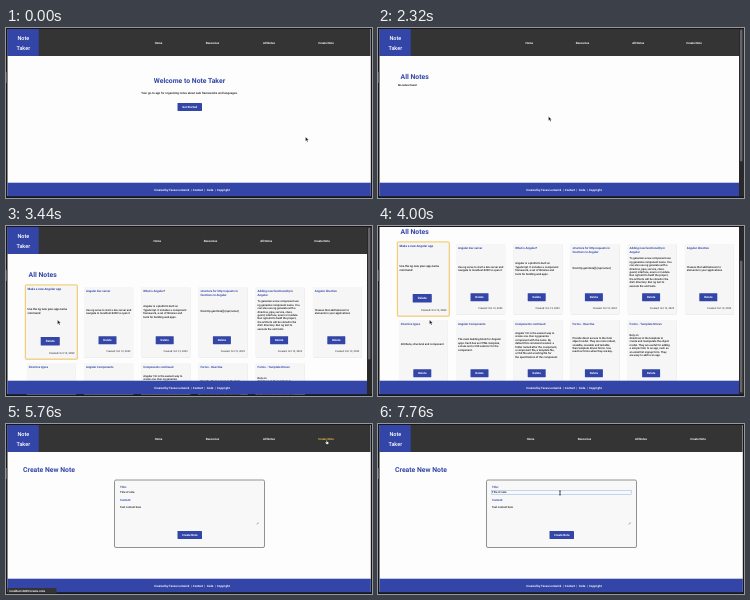
An HTML page that plays this animation: 366x170 px, repeating every 8 s.

```html
<!DOCTYPE html>
<html lang="en">
<head>
<meta charset="utf-8">
<title>Note Taker</title>
<style>
html, body { margin: 0; width: 100%; height: 100%; overflow: hidden; background: #fff; }
svg { display: block; width: 366px; height: 170px; }
text { font-family: Roboto, sans-serif; font-size: 2.9px; font-weight: 500; fill: #111; text-rendering: geometricPrecision; white-space: pre; }
.blue { fill: #3346a8; }
text.h1 { font-size: 6.85px; font-weight: 600; fill: #3346a8; }
text.bold { font-weight: 700; }
text.white { fill: #fff; font-weight: 700; }
text.small { font-size: 2.7px; }
text.date { font-size: 2.5px; fill: #444; }
text.logo { font-size: 5.5px; fill: #fff; }
</style>
</head>
<body>
<svg id="stage" viewBox="0 0 366 170"></svg>
<script>
const LOOP = 8000;
const OPEN_NOTES = 2240, NOTES_LOADED = 2640, OPEN_FORM = 5760;
const GOLD = '#f3bf3f';

const rect = (x, y, w, h, attrs = '') => `<rect x="${x}" y="${y}" width="${w}" height="${h}" ${attrs}/>`;
const text = (x, y, str, cls = '', anchor = 'start') =>
  `<text x="${x}" y="${y}" class="${cls}" text-anchor="${anchor}">${str.replace(/</g, '&lt;')}</text>`;
const group = (id, body) => `<g id="${id}">${body}</g>`;
const button = (x, y, w, label) =>
  rect(x, y, w, 8, 'class="blue" rx=".4"') + text(x + w / 2, y + 5, label, 'white', 'middle');

// title / body, lines split by "|"
const notes = [
  ['Make a new Angular app', 'Use the ng new your-app-name|command'],
  ['Angular dev server', 'Use ng serve to start a dev server and|navigate to localhost:4200 to open it'],
  ['What is Angular?', 'Angular is a platform built on|TypeScript. It includes a component|framework, a set of libraries and|tools for building web apps.'],
  ['structure for http requests in|functions in Angular', "this.http.get<Note[]>('api/notes')"],
  ['Adding new functionality in|Angular', 'To generate a new component use|ng generate component name. You|can also use ng generate with a|directive, pipe, service, class,|guard, interface, enum or module.|Run ng build to build the project,|the artifacts will be stored in the|dist/ directory. Run ng test to|execute the unit tests.'],
  ['Angular directive', 'Classes that add behavior to|elements in your applications'],
  ['Directive types', 'Attribute, structural and component'],
  ['Angular Components', 'The main building block for Angular|apps. Each has an HTML template,|a class and a CSS selector for the|component.'],
  ['Components continued', 'Angular CLI is the easiest way to|create one. Run ng generate|component with the name. By|default this command creates: a|folder named after the component,|a component file, a template file,|a CSS file and a testing file for|the specification of the component.'],
  ['Forms - Reactive', 'Provide direct access to the form|object model. They are more robust,|scalable, reusable and testable|than template driven forms. Use|reactive forms when they are key.'],
  ['Forms - Template Driven', 'Rely on|directives in the template to|create and manipulate the object|model. They are useful for adding|a simple form to an app, such as|an email list signup form. They|are easy to add to an app.']
];

const cardX = i => 20.8 + (i % 6) * 57.2;
const cardY = i => 61 + Math.floor(i / 6) * 76;

function card([title, body], i) {
  const x = cardX(i), y = cardY(i), heading = title.split('|'), lines = body.split('|');
  const first = y + Math.max(25.2 - (lines.length - 1) * 1.6, 7.5 + heading.length * 3.9);
  return group('card' + i,
    rect(x + .2, y + .4, 49, 70, 'fill="#e0e0e0" rx=".6"') +
    rect(x, y, 49, 70, 'fill="#f6f6f6" rx=".6" class="face"') +
    heading.map((line, k) => text(x + 2, y + 5 + k * 3.9, line, 'bold blue')).join('') +
    lines.map((line, k) => text(x + 2, first + k * 3.4, line, 'small')).join('') +
    button(x + 14.5, y + 49.2, 18, 'Delete') +
    text(x + 46.5, y + 65.2, 'Created: Oct 12, 2022', 'date', 'end'));
}

const nav = ['Home', 'Resources', 'All Notes', 'Create Note'];
const navWide = [152.5, 206.5, 263, 320], navNarrow = [151.3, 204.5, 260.3, 316];

const header = rect(1.5, 1, 363, 27, 'fill="#343434"') + rect(1.5, 1, 31.2, 27, 'class="blue"') +
  text(17.3, 12, 'Note', 'logo', 'middle') + text(17.3, 22, 'Taker', 'logo', 'middle') +
  nav.map((label, k) => `<g id="nav${k}">${text(0, 15.8, label, 'white', 'middle')}</g>`).join('');

const home = text(183.5, 55.3, 'Welcome to Note Taker', 'h1', 'middle') +
  text(183.5, 66, 'Your go-to app for organizing notes about web frameworks and languages.', '', 'middle') +
  button(171.5, 75, 24.5, 'Get Started');

const form = text(17, 48.2, 'Create New Note', 'h1') +
  rect(108.5, 56, 150, 67.5, 'fill="#f8f8f8" stroke="#777" stroke-width=".8" rx="1.5"') +
  text(114, 64, 'Title:', 'blue bold') + text(114, 69.3, 'Title of note', 'small') +
  rect(113.7, 66.4, 139.5, 4, 'id="focus" fill="none" stroke="#8fb4e6" stroke-width=".5"') +
  text(114, 77.3, 'Content:', 'blue bold') + text(114, 83.6, 'Text content here', 'small') +
  '<path d="M250.5 100.3l2-2M251.5 100.3l1-1" stroke="#555" stroke-width=".4"/>' +
  button(171.5, 107, 24.5, 'Create Note');

document.getElementById('stage').innerHTML =
  rect(0, 0, 366, 170, 'fill="#17171a"') + rect(1.5, 1, 363.3, 167, 'fill="#fdfdfd"') +
  rect(0, 44, 1.2, 11, 'fill="#555"') +
  group('page',
    group('header', header) + group('home', home) + group('form', form) +
    group('notes', text(22.6, 51, 'All Notes', 'h1') +
      group('empty', text(20, 58, 'No notes found', 'bold small')) +
      group('cards', notes.map(card).join('')))) +
  rect(1.5, 154.7, 363.3, 13.8, 'class="blue"') +
  text(186, 162.8, 'Created by Tessa Lornwick  |  Contact  |  Code  |  Copyright', 'white', 'middle') +
  group('scrollbar', rect(361, 0, 5, 168.5, 'fill="#29292b"') + rect(362, 1.5, 2.4, 132, 'id="thumb" fill="#66666a" rx="1.2"')) +
  rect(0, 0, 366, 1, 'fill="#17171a"') + rect(0, 168.5, 366, 1.5, 'fill="#17171a"') +
  group('status', rect(1.5, 164, 49, 5.5, 'fill="#343437" rx=".6"') +
    text(3.5, 167.8, 'localhost:4200/create-note', 'white')) +
  group('cursor',
    '<path id="arrow" d="M0 0v4.2l1-.9.8 1.6.8-.4-.8-1.5h1.4z" fill="#111" stroke="#fff" stroke-width=".3"/>' +
    '<path id="hand" d="M-.4-1.8h.9v1.6l1.7.5-.3 2.4h-2.4l-1.2-2 .5-.4.8.7z" fill="#fff" stroke="#111" stroke-width=".45"/>' +
    '<path id="beam" d="M-.7-2h1.4M0-2v4M-.7 2h1.4" stroke="#111" stroke-width=".7"/>');

const $ = id => document.getElementById(id);
const show = (id, on) => $(id).style.display = on ? '' : 'none';
const clamp = v => Math.max(0, Math.min(1, v));
const ramp = (t, from, to) => { const p = clamp((t - from) / (to - from)); return p * p * (3 - 2 * p); };
const pulse = (t, from, to) => ramp(t, from, from + 140) - ramp(t, to - 70, to + 70);

// time, x, y
const path = [
  [0, 299.5, 109], [880, 262, 103], [1360, 250, 101], [2080, 180, 80], [2200, 180, 80],
  [2320, 170.5, 88.5], [2560, 150, 92], [3120, 51.5, 94], [4700, 51.5, 94], [5200, 320, 17],
  [6160, 321, 18], [6480, 318, 22], [7200, 205, 66], [7520, 182, 69], [LOOP, 182, 69]
];
function cursorAt(t) {
  const k = path.findIndex(p => p[0] > t), [t0, x0, y0] = path[k - 1], [t1, x1, y1] = path[k];
  const p = ramp(t, t0, t1);
  return [x0 + (x1 - x0) * p, y0 + (y1 - y0) * p];
}

function hoverCard(i, amount) {
  const x = cardX(i) + 24.5, y = cardY(i) + 35, scale = 1 + .06 * amount;
  const el = $('card' + i), face = el.querySelector('.face');
  el.setAttribute('transform', `translate(${x} ${y}) scale(${scale}) translate(${-x} ${-y})`);
  face.setAttribute('stroke', GOLD);
  face.setAttribute('stroke-width', .8 * amount);
}

function draw(t) {
  const onNotes = t >= OPEN_NOTES && t < OPEN_FORM, onForm = t >= OPEN_FORM;
  show('home', t < OPEN_NOTES);
  show('notes', onNotes);
  show('form', onForm);
  show('scrollbar', onNotes);
  show('empty', t < NOTES_LOADED);
  show('cards', t >= NOTES_LOADED);

  const scroll = onNotes ? 43 * (ramp(t, 3560, 3940) - ramp(t, 4240, 4600)) : 0;
  $('page').setAttribute('transform', `translate(0 ${-scroll})`);
  $('thumb').setAttribute('y', 1.5 + scroll * .77);

  hoverCard(0, pulse(t, 3040, 4070) + pulse(t, 4680, 4860));
  hoverCard(6, pulse(t, 4030, 4330));

  const overLink = t >= 5120 && t < 6360;
  nav.forEach((_, k) => {
    $('nav' + k).setAttribute('transform', `translate(${(onNotes ? navNarrow : navWide)[k]} 0)`);
    $('nav' + k).firstChild.style.fill = overLink && k === 3 ? GOLD : '#fff';
  });
  show('status', t >= 5200 && t < 6440);
  show('focus', t >= 7520);

  const overInput = t >= 7160, overButton = t >= 1960 && t < OPEN_NOTES;
  $('cursor').setAttribute('transform', `translate(${cursorAt(t)})`);
  show('hand', overLink || overButton);
  show('beam', overInput);
  show('arrow', !(overLink || overButton || overInput));
}

const start = performance.now();
function tick() {
  draw((performance.now() - start) % LOOP);
  requestAnimationFrame(tick);
}
tick();
</script>
</body>
</html>
```
